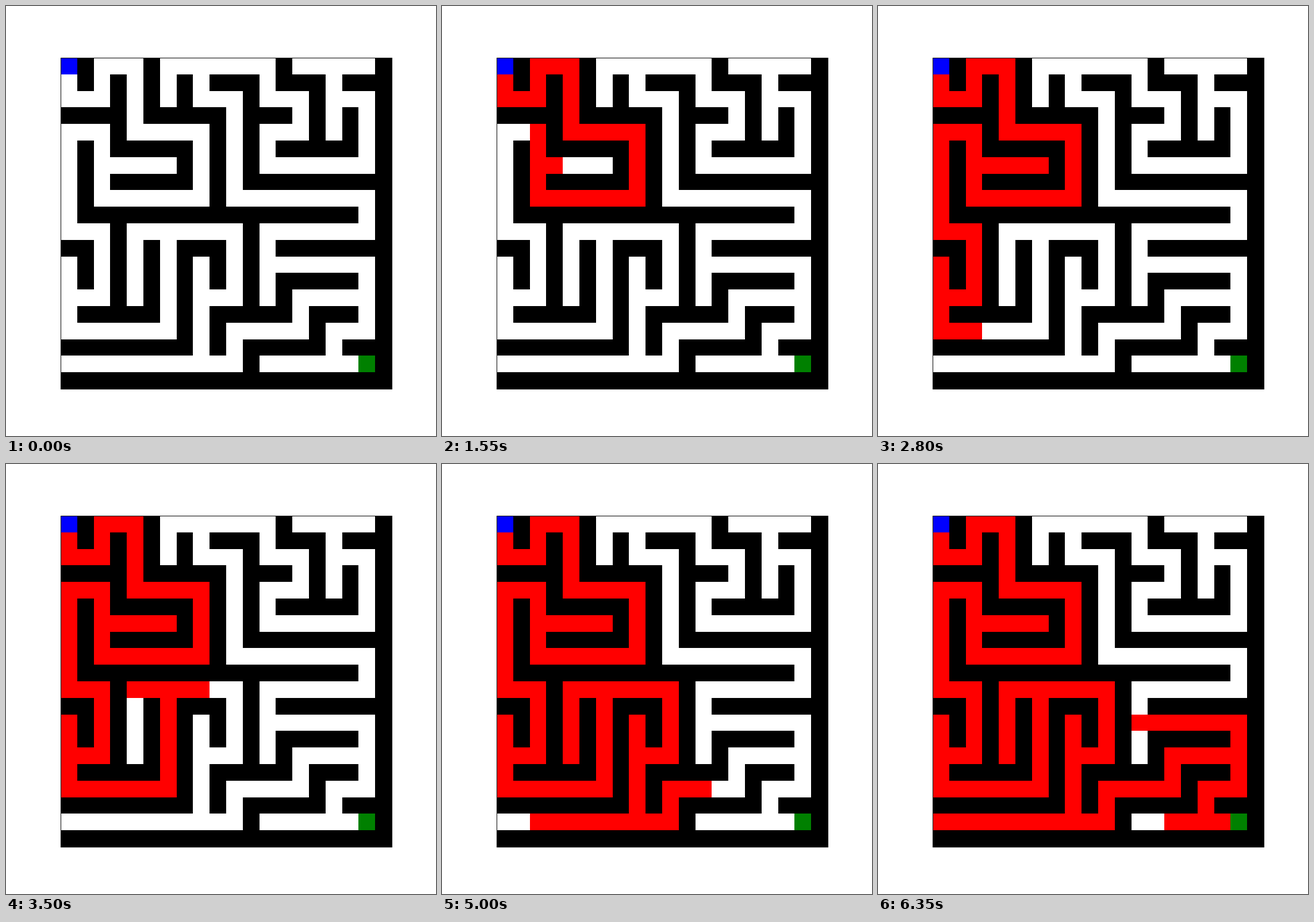
These frames come from a looping animation (748 px wide and 748 px high, 6450 ms). An HTML page with a canvas:

```html
<!DOCTYPE html>
<html>
<head>
<meta charset="utf-8">
<title>Maze search</title>
<style>
html, body { margin: 0; width: 100%; height: 100%; overflow: hidden; background: #fff; }
canvas { display: block; }
</style>
</head>
<body>
<canvas id="stage" width="748" height="748"></canvas>
<script>
const maze = `
.#...#.......#.....#
.#.#.#.#.###.###.###
...#.#.#...#...#...#
####.#####.###.#.#.#
...#.....#.#...#.#.#
.#.#####.#.#.#####.#
.#.....#.#.#.......#
.#.#####.#.#########
.#.......#.........#
.#################.#
...#.......#.......#
##.#.#.###.#.#######
.#.#.#.#.#.#.......#
.#.#.#.#.#.#.#####.#
...#.#.#...#.#.....#
.#####.#.#####.###.#
.......#.#.....#...#
########.#.#####.###
...........#.......#
####################`.trim().split('\n');

const CELL = 28.8, STEP = 50, LOOP = 6450, LAST = 127;
const ctx = document.getElementById('stage').getContext('2d');
const edgeX = c => Math.max(96, Math.floor(95.5 + CELL * c));
const edgeY = r => Math.max(91, Math.floor(90.5 + CELL * r));

function fillCell([r, c], color) {
  const x = edgeX(c), y = edgeY(r);
  ctx.fillStyle = color;
  ctx.fillRect(x, y, edgeX(c + 1) - x, edgeY(r + 1) - y);
}

// Breadth-first order in which the cells are discovered
function search(start) {
  const order = [start], seen = new Set([String(start)]);
  for (const [r, c] of order) {
    for (const [dr, dc] of [[-1, 0], [1, 0], [0, -1], [0, 1]]) {
      const next = [r + dr, c + dc];
      if (maze[next[0]]?.[next[1]] !== '.' || seen.has(String(next))) continue;
      seen.add(String(next));
      order.push(next);
    }
  }
  return order;
}

const order = search([0, 0]);

function draw(time) {
  const step = Math.min(LAST, Math.floor(time % LOOP / STEP));
  ctx.fillStyle = '#fff';
  ctx.fillRect(0, 0, 748, 748);
  ctx.fillStyle = '#000';
  ctx.fillRect(95, 90, 577, 577);
  order.forEach((cell, i) => fillCell(cell, i <= step ? '#f00' : '#fff'));
  fillCell([0, 0], '#00f');
  fillCell([18, 18], '#008000');
}

const begin = performance.now();
function tick() {
  draw(performance.now() - begin);
  requestAnimationFrame(tick);
}
tick();
</script>
</body>
</html>
```
